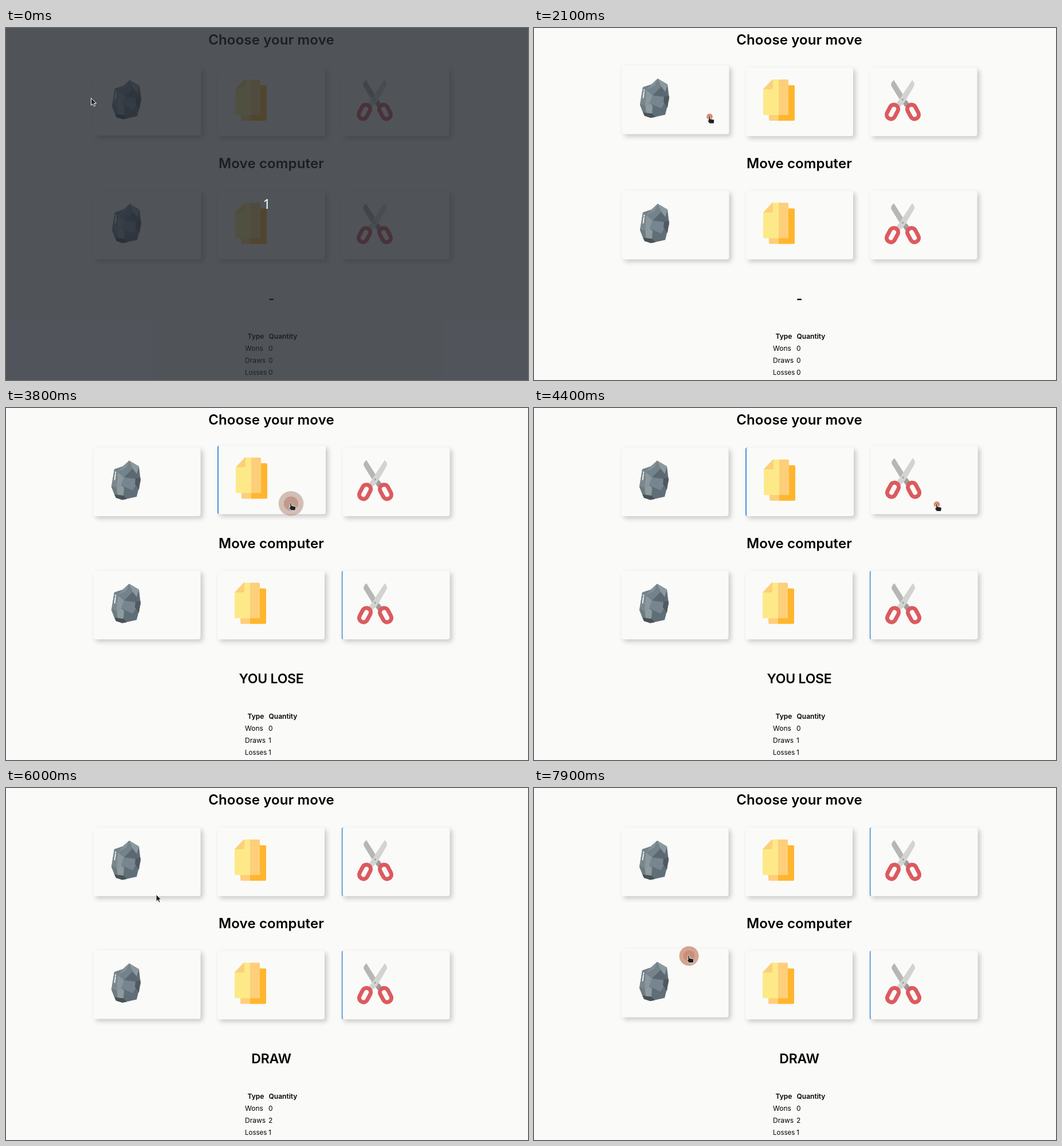
An HTML page for the animation above (8000 ms loop, 911 by 615 pixels).

```html
<!DOCTYPE html>
<html lang="en">
<head>
<meta charset="utf-8">
<title>Rock paper scissors</title>
<style>
  html, body { margin: 0; width: 100%; height: 100%; overflow: hidden; background: #fafaf8; }
  #stage { position: relative; width: 911px; height: 615px; overflow: hidden; }
  #stage > svg { position: absolute; left: 0; top: 0; }
  text { font-family: Inter, "Open Sans", sans-serif; font-size: 12px; fill: #000; }
  .head { font-size: 24px; font-weight: 600; text-anchor: middle; letter-spacing: .15px; }
  #result { font-size: 23px; letter-spacing: -.2px; }
  .th { font-weight: 600; text-anchor: middle; }
  .card {
    position: absolute; left: 0; top: 0; width: 187px; height: 120px;
    border-radius: 4px; background: #fafaf8;
    box-shadow: 4px 4px 8px rgba(0, 0, 0, .2);
  }
  .card.on { border-left: 2px solid #4a90e2; }
  .card svg { display: block; overflow: visible; }
  #shade { position: absolute; inset: 0; background: rgba(35, 40, 48, .79); }
  #count { font: 23px "Noto Sans", sans-serif; fill: #fff; text-anchor: middle; }
</style>
</head>
<body>
<div id="stage">
  <svg width="911" height="615">
    <defs>
      <g id="rock">
        <path fill="#606e78" d="M216 92L233 102 236 127 229 155 204 160.500 193 157 185 138 190 107 205 102Z"/>
        <path fill="#74828c" d="M216 92L222 106 207 121 196 112 190 107 205 102Z"/>
        <path fill="#8b999f" d="M216 92L233 102 229 115 222 106Z"/>
        <path fill="#5c6871" d="M222 106L229 115 235 123 207 122Z"/>
        <path fill="#84919a" d="M205 102L216 92 211 104 196 112Z"/>
        <path fill="#778591" d="M207 121L227 124 229 133 222 144 202 135Z"/>
        <path fill="#4f5a60" d="M227 123L236 122 233 143 226 133Z"/>
        <path fill="#7a888d" d="M190 107L196 112 194 139 185 137Z"/>
        <path fill="#8a979c" d="M196 112L207 121 202 135 194 139Z"/>
        <path fill="#6d7b80" d="M185 137L194 139 196 153 190 151Z"/>
        <path fill="#8d9a9e" d="M194 139L202 135 207 139 206 153 196 153Z"/>
        <path fill="#485257" d="M190 151L206 153 212 159 204 160.500 193 157Z"/>
        <path fill="none" stroke="#fff" stroke-width="1.700" stroke-dasharray="3 1 20" d="M192.500 111L190.500 126"/>
      </g>
      <g id="paper">
        <path fill="#ffb62e" d="M427 100H453Q455 100 455 102V160Q455 162 453 162H427Z"/>
        <path fill="#fdcf7b" d="M410 150H427V162H412Q410 162 410 160ZM427 90H442Q444 90 444 92V152H427Z"/>
        <path fill="#fde987" d="M416 90H427V152H402Q400 152 400 150V107Z"/>
        <path fill="#fdcf7b" d="M400 107L416 90H417V105Q417 107 415 107Z"/>
      </g>
      <g id="scissors">
        <path fill="#b6b6b4" d="M628 91Q621 97 624 102L640 128 648 138 655 132 650 126Z"/>
        <path fill="#9c9c9a" d="M647 127L651 127 655 133 648 138 644 131Z"/>
        <path fill="#d3d3d2" d="M660 91Q666 97 663 102L646 131 638 138 631 133 637 126Z"/>
        <circle cx="643.300" cy="125" r="1.700" fill="#a3a3a1"/>
        <g fill="none" stroke="#dc5a5e" stroke-width="7">
          <rect x="618" y="133.500" width="15" height="26" rx="7.500" transform="rotate(28 625.500 146.500)"/>
          <rect x="654" y="133.500" width="15" height="26" rx="7.500" transform="rotate(-28 661.500 146.500)"/>
        </g>
      </g>
    </defs>
    <text class="head" x="463" y="29">Choose your move</text>
    <text class="head" x="463" y="244.500">Move computer</text>
    <text class="head" x="463" y="481" id="result">-</text>
    <text class="th" x="436" y="543">Type</text>
    <text class="th" x="483.500" y="543">Quantity</text>
    <text x="417" y="564">Wons</text><text class="num" x="458" y="564">0</text>
    <text x="417" y="585">Draws</text><text class="num" x="458" y="585">0</text>
    <text x="417" y="606" style="font-size:11.500px">Losses</text><text class="num" x="458" y="606">0</text>
  </svg>
  <div id="cards"></div>
  <div id="shade"></div>
  <svg width="911" height="615">
    <text id="count" x="455" y="315.500">1</text>
    <g id="ripple"></g>
    <path id="arrow" fill="#222" stroke="#fff" stroke-width="1" d="M0 0V12.500L3 9.800 5 14.200 7.200 13.200 5.300 9H9.200Z"/>
    <path id="hand" fill="#222" stroke="#fff" stroke-width=".9" d="M-1.700-.5Q-.5-2.500 .9-.5V3.500L7 5Q8.500 5.500 8.300 7L7.500 12H0L-3.500 7.500Q-3.500 5.500-1.700 6.500Z"/>
  </svg>
</div>
<script>
const LOOP = 8000, LIFT = 3.6, FADE = 250, RIPPLE = 1300;
const $ = id => document.getElementById(id);

// time, x, y of the pointer
const PATH = [
  [-300, 190, 110], [-150, 152, 121], [0, 148.5, 122.5], [100, 104.5, 165], [200, 85, 207], [300, 76, 224],
  [500, 76, 224], [1200, 306.5, 155], [2600, 306.5, 155], [3100, 497.5, 167],
  [3850, 497.5, 167], [4350, 703, 168.5], [4750, 703, 168.5], [5400, 250, 330],
  [5500, 250, 330], [5830, 256, 284], [6000, 262, 186], [6300, 268, 150],
  [6650, 268, 150], [7450, 270.5, 293.5], [LOOP, 270.5, 293.5]
];
const CLICKS = [[2100, 306.5, 155], [3200, 497.5, 167], [4400, 703, 168.5], [7600, 270.5, 293.5]];
// time, player's pick, computer's pick, result, counters
const ROUNDS = [
  [0, -1, -1, "-", [0, 0, 0]],
  [2300, 0, 0, "DRAW", [0, 1, 0]],
  [3400, 1, 2, "YOU LOSE", [0, 1, 1]],
  [4600, 2, 2, "DRAW", [0, 2, 1]]
];

const mix = (a, b, p) => a + (b - a) * p;
const rgba = (a, b, p, alpha) => `rgba(${a.map((v, i) => Math.round(mix(v, b[i], p)))},${alpha})`;
const latest = (list, t) => list.filter(s => s[0] <= t).pop();

const cards = [];
for (let row = 0; row < 2; row++) {
  ["rock", "paper", "scissors"].forEach((name, i) => {
    const el = document.createElement("div");
    const x = 153.5 + 216.5 * i;
    el.className = "card";
    el.innerHTML = `<svg width="187" height="120" viewBox="${x} 69 187 120"><use href="#${name}"/></svg>`;
    $("cards").append(el);
    cards.push({ el, row, i, x, y: 69 + 215.3 * row });
  });
}

function pointer(t) {
  const k = Math.max(1, PATH.findIndex(s => s[0] > t));
  const [t0, x0, y0] = PATH[k - 1], [t1, x1, y1] = PATH[k];
  const p = Math.max(0, (t - t0) / (t1 - t0));
  const e = p * p * (3 - 2 * p);
  return [mix(x0, x1, e), mix(y0, y1, e)];
}

const over = (c, [x, y]) => x > c.x && x < c.x + 187 && y > c.y && y < c.y + 116;

// share of the last FADE ms spent over the card
function lift(c, t) {
  let n = 0;
  for (let k = 0; k < 20; k++) n += over(c, pointer(t - k * FADE / 20));
  return LIFT * n / 20;
}

// a new click replaces the ripple of the one before
function ripple(t) {
  const click = latest(CLICKS, t);
  if (!click || t - click[0] >= RIPPLE) return "";
  const [start, x, y] = click;
  const p = (t - start) / RIPPLE;
  const r = 5.5 + 18 * (1 - (1 - p) ** 4);
  const outer = rgba([225, 137, 108], [120, 135, 135], p, Math.max(0, 1 - 1.04 * p));
  const inner = rgba([200, 90, 62], [135, 122, 112], p, .25 + .4 * p);
  return `<circle cx="${x}" cy="${y}" r="${r}" fill="${outer}" stroke="rgba(255,255,255,.4)"/>
    <circle cx="${x}" cy="${y}" r="${r * .57}" fill="${inner}"/>`;
}

function draw(t) {
  const [, mine, theirs, label, counts] = latest(ROUNDS, t);
  const pos = pointer(t);
  for (const c of cards) {
    const pick = c.row ? theirs : mine;
    const shift = pick < 0 ? 0 : c.i > pick ? 1 : -1;
    c.el.classList.toggle("on", pick === c.i);
    c.el.style.transform = `translate(${c.x + shift}px,${c.y - lift(c, t)}px)`;
  }
  $("result").textContent = label;
  document.querySelectorAll(".num").forEach((el, i) => el.textContent = counts[i]);
  $("shade").style.display = $("count").style.display = t < 100 ? "" : "none";
  $("ripple").innerHTML = ripple(t);
  const hand = cards.some(c => over(c, pos));
  $("hand").style.display = hand ? "" : "none";
  $("arrow").style.display = hand ? "none" : "";
  $(hand ? "hand" : "arrow").setAttribute("transform", `translate(${pos})`);
}

const start = performance.now();
function tick() {
  draw((performance.now() - start) % LOOP);
  requestAnimationFrame(tick);
}
tick();
</script>
</body>
</html>
```
